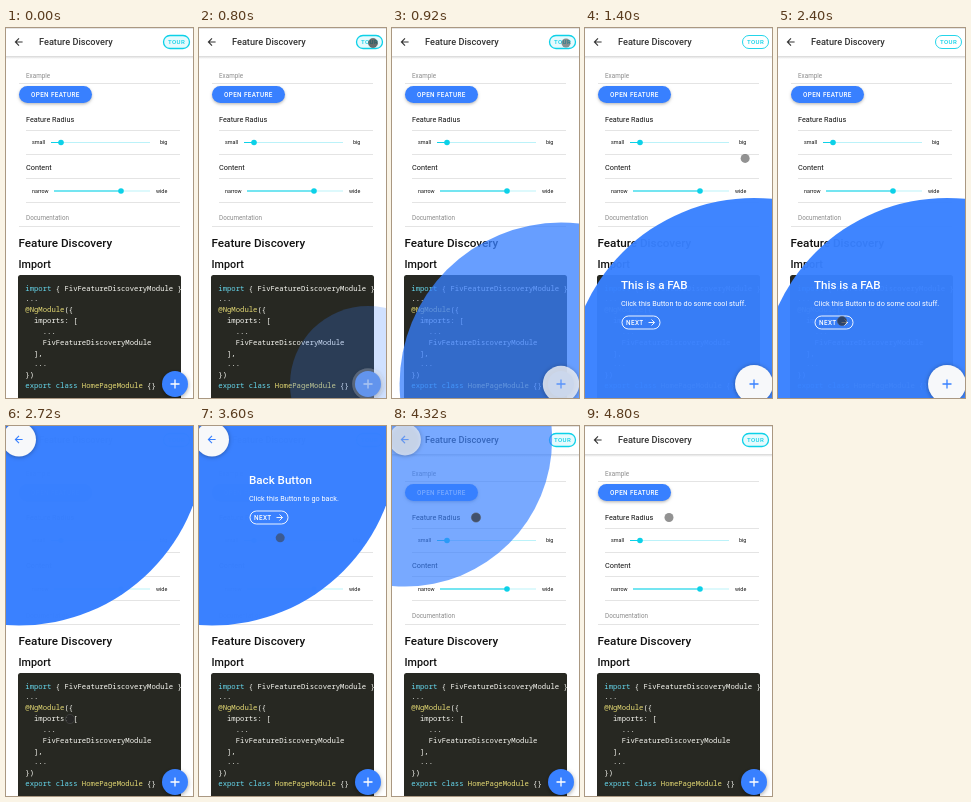
Animation, 187 px wide and 370 px high, one loop 4.84 s. Source, as an HTML page with a canvas:

```html
<!DOCTYPE html>
<html lang="en">
<head>
<meta charset="utf-8">
<title>Feature Discovery</title>
<style>
  html, body { margin: 0; width: 100%; height: 100%; overflow: hidden; background: #fff; }
  canvas { display: block; width: 187px; height: 370px; }
</style>
</head>
<body>
<canvas id="stage"></canvas>
<script>
const W = 187, H = 370, LOOP = 4840;
const BLUE = '#3880ff', CYAN = '#0cd1e8', INK = '#111', RULE = '#dedede';
const SANS = 'Roboto, sans-serif', MONO = '"Noto Sans Mono", monospace';
const REACH = 186;

const canvas = document.getElementById('stage');
const ctx = canvas.getContext('2d');
const ratio = window.devicePixelRatio || 1;
canvas.width = W * ratio;
canvas.height = H * ratio;

const clamp = v => Math.max(0, Math.min(1, v));
const ramp = (t, start, length) => clamp((t - start) / length);
const smooth = u => u * u * (3 - 2 * u);
const mix = (a, b, u) => a + (b - a) * u;

function text(str, x, y, size, { color = INK, weight = 400, family = SANS, align = 'left', spacing = 0 } = {}) {
  ctx.font = `${weight} ${size}px ${family}`;
  ctx.letterSpacing = spacing + 'px';
  ctx.textAlign = align;
  ctx.fillStyle = color;
  ctx.fillText(str, x, y);
}

function disc(x, y, r, color) {
  ctx.fillStyle = color;
  ctx.beginPath();
  ctx.arc(x, y, r, 0, Math.PI * 2);
  ctx.fill();
}

function pill(x, y, w, h, { fill, stroke, line = 1, radius = h / 2 }) {
  ctx.beginPath();
  ctx.roundRect(x, y, w, h, radius);
  if (fill) { ctx.fillStyle = fill; ctx.fill(); }
  if (stroke) { ctx.strokeStyle = stroke; ctx.lineWidth = line; ctx.stroke(); }
}

function lines(color, width, ...paths) {
  ctx.strokeStyle = color;
  ctx.lineWidth = width;
  ctx.beginPath();
  for (const path of paths) path.forEach(([x, y], i) => i ? ctx.lineTo(x, y) : ctx.moveTo(x, y));
  ctx.stroke();
}

function shadowed(blur, offset, alpha, draw) {
  ctx.save();
  ctx.shadowColor = `rgba(0,0,0,${alpha})`;
  ctx.shadowBlur = blur * ratio;
  ctx.shadowOffsetY = offset * ratio;
  draw();
  ctx.restore();
}

// A horizontal arrow; dir is -1 for left, 1 for right.
function arrow(x, y, half, dir, color, width) {
  const tip = x + half * dir, back = x;
  lines(color, width, [[x - half * dir, y], [tip, y]], [[back, y - half], [tip, y], [back, y + half]]);
}

function plus(x, y, color) {
  lines(color, 1.3, [[x - 4.5, y], [x + 4.5, y]], [[x, y - 4.5], [x, y + 4.5]]);
}

function toolbar(focused) {
  ctx.fillStyle = '#e4e4e4';
  ctx.fillRect(0, 0, W, 1);
  const shade = ctx.createLinearGradient(0, 28, 0, 31);
  shade.addColorStop(0, 'rgba(0,0,0,.16)');
  shade.addColorStop(1, 'rgba(0,0,0,0)');
  ctx.fillStyle = shade;
  ctx.fillRect(0, 28, W, 3);
  arrow(13, 14, 3.6, -1, '#333', 1.1);
  text('Feature Discovery', 33, 17.3, 9.2, { weight: 500, color: '#333' });
  pill(157.5, 7.5, 26, 13, { fill: focused && 'rgba(12,209,232,.1)', stroke: CYAN, line: focused ? 1.3 : 0.9 });
  text('TOUR', 162, 16.4, 6.1, { weight: 500, color: CYAN, spacing: 0.36 });
}

function slider(y, left, knob, low, high, highX) {
  text(low, 26, y + 1.8, 5.4);
  text(high, highX, y + 1.8, 5.4);
  ctx.fillStyle = 'rgba(12,209,232,.28)';
  ctx.fillRect(left, y - 0.5, 144 - left, 1);
  ctx.fillStyle = CYAN;
  ctx.fillRect(left, y - 0.5, knob - left, 1);
  disc(knob, y, 2.8, CYAN);
}

const CODE = [
  [['import', 'k'], [' { FivFeatureDiscoveryModule }']],
  [['...']],
  [['@NgModule', 'y'], ['({']],
  [['  imports: [']],
  [['    ...']],
  [['    FivFeatureDiscoveryModule']],
  [['  ],']],
  [['  ...']],
  [['})']],
  [['export class ', 'k'], ['HomePageModule', 'y'], [' {}']]
];
const CODE_COLORS = { k: '#66d9ef', y: '#e6db74' };

function codeBlock() {
  ctx.save();
  pill(12, 247, 163, 130, { fill: '#272822', radius: 2.5 });
  ctx.clip();
  CODE.forEach((row, i) => {
    let x = 19.3;
    for (const [part, kind] of row) {
      text(part, x, 262.6 + i * 10.82, 7.26, { family: MONO, color: CODE_COLORS[kind] || '#f8f8f2' });
      x += ctx.measureText(part).width;
    }
  });
  ctx.restore();
}

function page(focused) {
  ctx.fillStyle = '#fff';
  ctx.fillRect(0, 0, W, H);
  toolbar(focused);
  text('Example', 20, 50.4, 6.3, { color: '#8c8c8c' });
  text('Documentation', 20, 192.4, 6.3, { color: '#8c8c8c' });
  ctx.fillStyle = RULE;
  for (const y of [55, 198]) ctx.fillRect(13, y, 161, 0.8);
  for (const y of [102, 126, 150, 174]) ctx.fillRect(20, y, 154, 0.8);
  shadowed(3, 1.2, 0.28, () => pill(13, 58, 73, 17, { fill: BLUE }));
  text('OPEN FEATURE', 25, 68.9, 6.3, { weight: 500, color: '#fff', spacing: 0.38 });
  text('Feature Radius', 20, 93.8, 7.25);
  slider(114.5, 45, 55, 'small', 'big', 154);
  text('Content', 20, 142, 7.3);
  slider(163, 48, 115, 'narrow', 'wide', 150);
  text('Feature Discovery', 12.5, 218.6, 11.7, { weight: 500 });
  text('Import', 12.5, 240.4, 10.8, { weight: 500 });
  codeBlock();
  shadowed(4, 1.5, 0.35, () => disc(169, 356, 13, BLUE));
  plus(169, 356, '#fff');
}

const STEPS = [
  {
    x: 169, y: 356, spot: 19, alpha: 0.96, open: [720, 240], close: [2430, 160], copy: 960,
    icon: () => plus(169, 356, BLUE),
    left: 36, top: 261, title: 'This is a FAB', body: 'Click this Button to do some cool stuff.', action: 'NEXT'
  },
  {
    x: 13, y: 13.5, spot: 17, alpha: 0.99, open: [2480, 220], close: [4260, 240], copy: 2760,
    icon: () => arrow(13, 13.5, 3.6, -1, BLUE, 1.1),
    left: 50, top: 58, title: 'Back Button', body: 'Click this Button to go back.', action: 'NEXT'
  }
];

function discovery(step, t) {
  const shown = ramp(t, ...step.open) * (1 - ramp(t, ...step.close));
  if (!shown) return;
  const fade = shown ** 1.3;
  ctx.save();
  ctx.globalAlpha = step.alpha * fade;
  disc(step.x, step.y, REACH * shown ** 0.8, BLUE);
  ctx.globalAlpha = fade;
  shadowed(4, 0.5, 0.35, () => disc(step.x, step.y, step.spot * mix(0.75, 1, shown), '#f7f8fa'));
  step.icon();

  ctx.globalAlpha = ramp(t, step.copy, 200) * (1 - ramp(t, step.close[0], 40));
  const { left, top } = step;
  text(step.title, left, top, 11.6, { weight: 500, color: '#fff' });
  text(step.body, left, top + 17.4, 7.25, { color: '#fff' });
  pill(left + 1, top + 27, 38, 13, { stroke: '#fff', line: 0.9 });
  text(step.action, left + 5, top + 35.8, 6.4, { weight: 500, color: '#fff', spacing: 0.38 });
  arrow(left + 30.5, top + 33.5, 3, 1, '#fff', 0.9);
  ctx.restore();
}

// Pointer strokes: start, length, then from, bend and to points.
const MOVES = [
  [60, 500, [194, 104], [184, 50], [174, 15]],
  [1054, 800, [174, 15], [182, 162], [64, 293]],
  [2880, 900, [64, 293], [70, 190], [84, 91.5]]
];
const PRESSES = [[650, 260], [2340, 420], [4220, 220]];

function pointer(t) {
  if (t < MOVES[0][0]) return;
  const [start, length, a, b, c] = MOVES.filter(m => t >= m[0]).pop();
  const u = smooth(ramp(t, start, length));
  const [x, y] = a.map((v, i) => mix(mix(v, b[i], u), mix(b[i], c[i], u), u));
  const pressed = PRESSES.some(([from, span]) => t >= from && t < from + span);
  disc(x, y, 4.5, pressed ? 'rgba(40,40,40,.68)' : 'rgba(60,60,60,.56)');
  if (pressed) {
    ctx.strokeStyle = 'rgba(80,80,80,.6)';
    ctx.lineWidth = 0.9;
    ctx.beginPath();
    ctx.arc(x, y, 4.6, 0, Math.PI * 2);
    ctx.stroke();
  }
}

function render(t) {
  ctx.setTransform(ratio, 0, 0, ratio, 0, 0);
  page(t < 1000 || t > 2500);
  STEPS.forEach(step => discovery(step, t));
  pointer(t);
}

const begin = performance.now();
function tick() {
  render((performance.now() - begin) % LOOP);
  requestAnimationFrame(tick);
}
tick();
</script>
</body>
</html>
```
